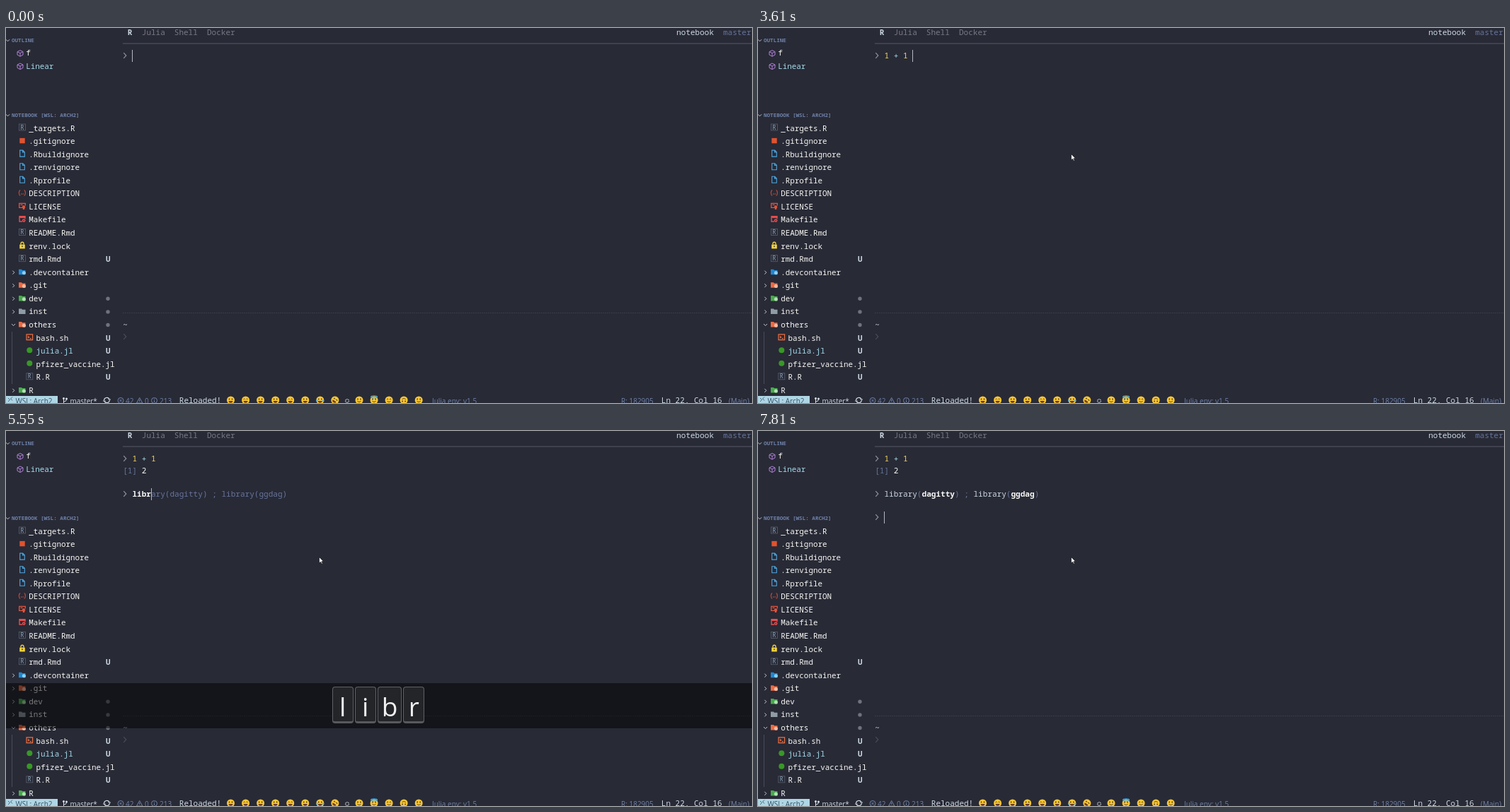
Write an HTML page that moves like this. It is 1054 px wide and 531 px high and loops after 8 s.

```html
<!DOCTYPE html>
<html lang="en">
<head>
<meta charset="utf-8">
<title>Terminal session</title>
<style>
  html, body { margin: 0; width: 100%; height: 100%; overflow: hidden; background: #282a36; }
  svg { position: absolute; left: 0; top: 0; display: block; }
  text { white-space: pre; font: 500 11px "Noto Sans Mono", "DejaVu Sans Mono", monospace; fill: #f8f8f4; }
  #sidebar text { font-size: 10.9px; }
  #console text { font-size: 11.05px; }
  #sidebar .head { font-size: 7.6px; font-weight: 700; fill: #6f82a8; }
  .ui { font: 10px "Open Sans", "Noto Sans", sans-serif; fill: #6f82a8; }
  .dim { fill: #777982; }
  .hint { fill: #66759c; font-weight: 400; }
  .cyan { fill: #a3dbea; }
  .num { fill: #f3d45c; }
  .pale { fill: #cbd8e2; }
  .bold { font-weight: 600; }
  .line { fill: none; stroke-width: 1; }
  #bar {
    position: absolute; left: 0; top: 357px; width: 1052px; height: 64px; padding-right: 2px;
    display: flex; justify-content: center; gap: 2px; background: rgba(0, 0, 0, .5); opacity: 0;
  }
  #bar span {
    box-sizing: border-box; height: 52px; min-width: 30px; margin-top: 5px; padding: 0 5px;
    border: 1px solid #606166; border-bottom: 3px solid #58595d; border-radius: 4px;
    background: #242529; color: #f0f0f0; text-align: center; white-space: pre;
    font: 37px/53px "Open Sans", "Noto Sans", sans-serif;
  }
  #pointer {
    visibility: hidden;
    animation: travel 8s step-end infinite;
  }
  @keyframes travel {
    0% { visibility: hidden; }
    0.875% { visibility: visible; transform: translate(1005px, 521px); }
    1.75% { visibility: visible; transform: translate(780px, 385px); }
    2.625% { visibility: visible; transform: translate(530px, 228px); }
    3.5%, 100% { visibility: visible; transform: translate(442px, 178px); }
  }
</style>
</head>
<body>
<svg id="stage" width="1054" height="531" viewBox="0 0 1054 531">
  <g id="sidebar"></g>
  <g id="panel"></g>
  <g id="console"></g>
  <g id="status"></g>
</svg>
<div id="bar"></div>
<svg width="1054" height="531" viewBox="0 0 1054 531">
  <path id="pointer" d="M.5.5V9L2.6 7.2 4 10.2 5.4 9.5 4 6.7H6.7Z" fill="#fff" stroke="#14151a" stroke-width=".7"/>
</svg>
<script>
const LOOP = 8000, CHAR = 6.63, LEFT = 165.2, ROW = 18.57;
const $ = id => document.getElementById(id);
const text = (x, y, s, cls = '') => `<text x="${x}" y="${y}" class="${cls}">${s}</text>`;
const span = (s, cls) => `<tspan class="${cls}">${s}</tspan>`;
const stroke = (d, color, w = 1) => `<path class="line" d="${d}" stroke="${color}" style="stroke-width:${w}"/>`;
const circle = (x, y, r, fill) => `<circle cx="${x}" cy="${y}" r="${r}" fill="${fill}"/>`;
const rect = (x, y, w, h, fill) => `<rect x="${x}" y="${y}" width="${w}" height="${h}" fill="${fill}"/>`;
const right = (x, y) => stroke(`M${x - 1.2} ${y - 2.5}l2.5 2.5-2.5 2.5`, '#c6cad2');
const down = (x, y) => stroke(`M${x - 2.5} ${y - 1.2}l2.5 2.5 2.5-2.5`, '#c6cad2');

// Icons are drawn around their own centre.
const folder = (fill, badge) =>
  `<path d="M-5-3.5h4l1 1.2h4.5v6.3h-9.5z" fill="${fill}"/>` + (badge ? circle(2.4, 1.6, 2.5, badge) : '');
const icons = {
  r: () => `<rect x="-4.5" y="-5" width="9" height="9" fill="none" stroke="#59616f" stroke-width=".8"/>` +
    `<text x="-2.5" y="2.6" style="font-size:8px;fill:#8fa9bd">R</text>`,
  git: () => rect(-3.7, -3.7, 7.4, 7.4, '#e2522f'),
  file: () => stroke('M-3.3-5h4l2.6 2.6v6.4h-6.6zM.5-5v2.8h2.8', '#4da6e0', 1.1),
  braces: () => stroke('M-2.8-4.2q-1.4 0-1.4 1.4v1q0 1.2-1 1.4q1 .2 1 1.4v1q0 1.4 1.4 1.4' +
    'M2.6-4.2q1.4 0 1.4 1.4v1q0 1.2 1 1.4q-1 .2-1 1.4v1q0 1.4-1.4 1.4', '#e5533d') +
    circle(-1.2, 1.2, .7, '#e5533d') + circle(1.1, 1.2, .7, '#e5533d'),
  license: () => stroke('M0 2h-4.3v-6h8.6v3M-2.5-2h3', '#e5533d', 1.3) + circle(2, 1, 2.2, '#e5533d') +
    rect(.8, 2, 2.4, 2.6, '#e5533d'),
  make: () => stroke('M0 3h-4v-7.2h8v3.2M-4-2.8h8', '#e84d4d', 1.4) + circle(2.2, 1.6, 2.3, '#e84d4d') + circle(2.2, 1.6, .8, '#282a36'),
  lock: () => rect(-3.8, -1.5, 7.6, 5.8, '#f4d23c') + stroke('M-2-1.5v-1.4a2 2 0 0 1 4 0v1.4', '#f4d23c', 1.3) + circle(0, 1.2, 1, '#5a4f20'),
  shell: () => stroke('M-4.3-4.2h8.6v7.7h-8.6zM-2.5-2l1.8 1.6-1.8 1.6M.3 1.5h2.2', '#ee7043', 1.2),
  julia: () => circle(0, -.5, 4, '#389826'),
  blue: () => folder('#2187d0', '#8fd0f5'),
  orange: () => folder('#ee6a42', '#f9bfa8'),
  green: () => folder('#48a94d', '#b5e0b4'),
  grey: () => folder('#8f9ca5')
};

// [name, icon, mark, state]; state: c closed folder, o open folder, n nested file
const files = [
  ['_targets.R', 'r'], ['.gitignore', 'git'], ['.Rbuildignore', 'file'], ['.renvignore', 'file'],
  ['.Rprofile', 'file'], ['DESCRIPTION', 'braces'], ['LICENSE', 'license'], ['Makefile', 'make'],
  ['README.Rmd', 'r'], ['renv.lock', 'lock'], ['rmd.Rmd', 'r', 'U'],
  ['.devcontainer', 'blue', '', 'c'], ['.git', 'orange', '', 'c'], ['dev', 'green', '*', 'c'],
  ['inst', 'grey', '*', 'c'], ['others', 'orange', '*', 'o'],
  ['bash.sh', 'shell', 'U', 'n'], ['julia.jl', 'julia', 'U', 'n'],
  ['pfizer_vaccine.jl', 'julia', '', 'n'], ['R.R', 'r', 'U', 'n'], ['R', 'green', '', 'c']
];

function fileRow([name, icon, mark, state], i) {
  const y = 141.3 + i * ROW, shift = state === 'n' ? 10.3 : 0;
  let out = `<g transform="translate(${23 + shift} ${y - .3})">${icons[icon]()}</g>`;
  out += text(32.2 + shift, y + 4.2, name, name === 'julia.jl' ? 'cyan' : '');
  if (state === 'c') out += right(10.5, y + .6);
  if (state === 'o') out += down(10.5, y + .4);
  if (mark === 'U') out += text(141, y + 4.2, 'U', 'pale bold');
  if (mark === '*') out += circle(144, y + .6, 2.7, '#70727c');
  return out;
}

function symbol(y, name, cls) {
  return stroke(`M20 ${y - 4.2}l4 2v4.4l-4 2.2-4-2.2v-4.4zM16 ${y - 2.2}l4 2 4-2M20 ${y - .2}v4.6`, '#b180d7') +
    text(28.2, y + 3.5, name, cls);
}

$('sidebar').innerHTML =
  down(2.5, 17.5) + text(8, 19.5, 'OUTLINE', 'head') +
  symbol(35.8, 'f', '') + symbol(54.2, 'Linear', 'cyan') +
  down(2.5, 123.5) + text(8, 125.5, 'NOTEBOOK [WSL: ARCH2]', 'head') +
  stroke('M8.5 430V504', '#4a4d59') + files.map(fileRow).join('');

const prompt = (y, color = '#9598a2') => stroke(`M166.2 ${y - 3.8}l3.6 3.8-3.6 3.8`, color, 1.1);

$('panel').innerHTML =
  text(171.8, 9.6, 'R', 'pale bold') +
  [[191.8, 'Julia'], [237.8, 'Shell'], [284, 'Docker']].map(([x, s]) => text(x, 9.6, s, 'dim')).join('') +
  text(947.2, 9.6, 'notebook', 'pale') + text(1013.2, 9.6, 'master', 'hint') +
  stroke('M165 22H1054', '#565966') +
  `<path d="M165 403.5H1054" stroke="#3a3d49" stroke-dasharray="2 1"/>` +
  text(LEFT, 424, '~', 'pale') + prompt(437, '#4c4f5a');

// Smileys in the status line, cut off by the lower edge
function face(x, i) {
  const y = 527, ink = '#4a3512';
  const eyes = i % 3 === 1
    ? stroke(`M${x - 3.2} ${y - 1}l1.2-1 1.2 1M${x + .8} ${y - 1}l1.2-1 1.2 1`, ink, .9)
    : circle(x - 2, y - 1.5, .9, ink) + circle(x + 2, y - 1.5, .9, ink);
  const mouth = i < 8
    ? `<path d="M${x - 2.9} ${y + 1}h5.8a2.9 2.8 0 0 1-5.8 0z" fill="#6d3a1c"/>`
    : stroke(`M${x - 2.6} ${y + 1.3}q2.6 2.6 5.2 0`, ink, .9);
  const turn = i === 7 ? 35 : i === 11 ? 180 : 0;
  const halo = i === 9
    ? `<ellipse cx="${x}" cy="${y - 4.8}" rx="4.4" ry="1.4" fill="none" stroke="#4db4e8" stroke-width="1.2"/>` : '';
  const tears = i === 6 ? circle(x - 4.3, y + 1, 1.4, '#5cb8ea') + circle(x + 4.3, y + 1, 1.4, '#5cb8ea') : '';
  return `<g transform="rotate(${turn} ${x} ${y})">${circle(x, y, 5.5, '#fbc735')}${eyes}${mouth}${tears}</g>${halo}`;
}
const faceX = i => i < 8 ? 317.5 + i * 21.05 : 499 + (i - 8) * 21.05;
const faces = Array.from({ length: 13 }, (_, i) => face(faceX(i), i)).join('');

$('status').innerHTML =
  rect(0, 521, 73, 10, '#aed6e5') +
  stroke('M3 524l2.5 2.5-2.5 2.5M9 522.5l-2.5 2.5 2.5 2.5', '#45657a') +
  `<text x="13.5" y="532" class="ui" style="fill:#365266">WSL: Arch2</text>` +
  stroke('M81.5 525v6M81.5 529q4 0 4-3', '#d4e0e8') + circle(81.5, 524.5, 1.5, '#d4e0e8') + circle(85.5, 525, 1.5, '#d4e0e8') +
  text(90.5, 532, 'master*', 'ui pale') +
  stroke('M138.5 527a4 4 0 0 1 7.5-1.5M146.5 527a4 4 0 0 1-7.5 1.5M144.5 526h3.5M137 528h3.5', '#d4e0e8', 1.2) +
  stroke('M158 527.5a4 4 0 1 1 8 0a4 4 0 1 1-8 0M160.5 526l3 3M163.5 526l-3 3', '#6f82a8') +
  text(169, 532, '42', 'ui') +
  stroke('M184.5 531l4.2-7.5 4.2 7.5zM188.7 526v3', '#6f82a8') + text(196, 532, '0', 'ui') +
  stroke('M205.5 527.5a4 4 0 1 1 8 0a4 4 0 1 1-8 0M209.5 525v1M209.5 527v3', '#6f82a8') + text(217, 532, '213', 'ui') +
  text(244.8, 531, 'Reloaded!', 'pale') + faces +
  `<circle cx="482" cy="528" r="2.4" fill="none" stroke="#aeb4bc" stroke-width="1.4" stroke-dasharray="1.3 .6"/>` +
  text(602, 532, 'Julia env: v1.5', 'ui') + text(869, 532, 'R: 182905', 'ui') +
  text(925.8, 531, 'Ln 22, Col 16', 'pale') + text(1021, 532, '(Main)', 'ui');

const caret = (n, top) => rect(178 + Math.round(n * CHAR), top, 1, 17, '#b4b8bf');
const input = (y, body) => prompt(y) + text(LEFT + 2 * CHAR, y + 4, body);
const sum = span('1', 'num') + span(' + ', 'cyan') + span('1', 'num');
const code = 'library(dagitty) ; library(ggdag)';
const call = name => span('library', 'pale') + span('(', 'hint') + span(name, 'bold') + span(')', 'hint');
const coloured = call('dagitty') + span(' ; ', 'hint') + call('ggdag');

const keyTimes = [
  [1540, '1'], [2720, 'Alt+L'], [3740, 'Enter'],
  [5150, 'l'], [5230, 'l i'], [5390, 'l i b'], [5550, 'l i b r'],
  [6630, 'Alt+L'], [7030, 'Alt+L Enter']
];
// [start, end, step length, steps]
const shows = [[1540, 2320, 80, 4], [2720, 3610, 80, 4], [3740, 4520, 85, 3], [5150, 6310, 80, 4], [6630, 7810, 80, 4]];

function consoleAt(t, typed) {
  if (t < 1540) return input(39, '') + caret(0, 31);
  if (t < 2720) return input(39, span('1', 'num') + span(' + 1', 'hint')) + caret(1, 31);
  if (t < 3740) return input(39, sum) + caret(6, 31);
  const done = input(39, sum) + text(LEFT, 59.5, span('[1]', 'hint') + ' 2');
  if (t < 5150) return done + input(89, '') + caret(0, 81);
  if (t < 6630) {
    return done + input(89, span(code.slice(0, typed), 'bold') + span(code.slice(typed), 'hint')) + caret(typed, 81);
  }
  const ran = done + input(89, coloured);
  return t < 7030 ? ran + caret(code.length, 81) : ran + input(122, '') + caret(0, 114);
}

function setHtml(node, html) {
  if (node.shown !== html) node.innerHTML = node.shown = html;
}

function draw(now) {
  const t = Math.max(0, now) % LOOP;
  const current = keyTimes.filter(([at]) => t >= at).pop();
  const keys = current ? current[1].split(' ') : [];
  const show = shows.find(([from, to]) => t >= from && t < to);
  $('bar').style.opacity = show ? Math.min(1, (Math.floor((t - show[0]) / show[2]) + 1) / show[3]) : 0;
  setHtml($('bar'), keys.map(k => `<span>${k}</span>`).join(''));
  setHtml($('console'), consoleAt(t, keys.length));
}

const start = performance.now();
function tick() {
  draw(performance.now() - start);
  requestAnimationFrame(tick);
}
tick();
</script>
</body>
</html>
```
